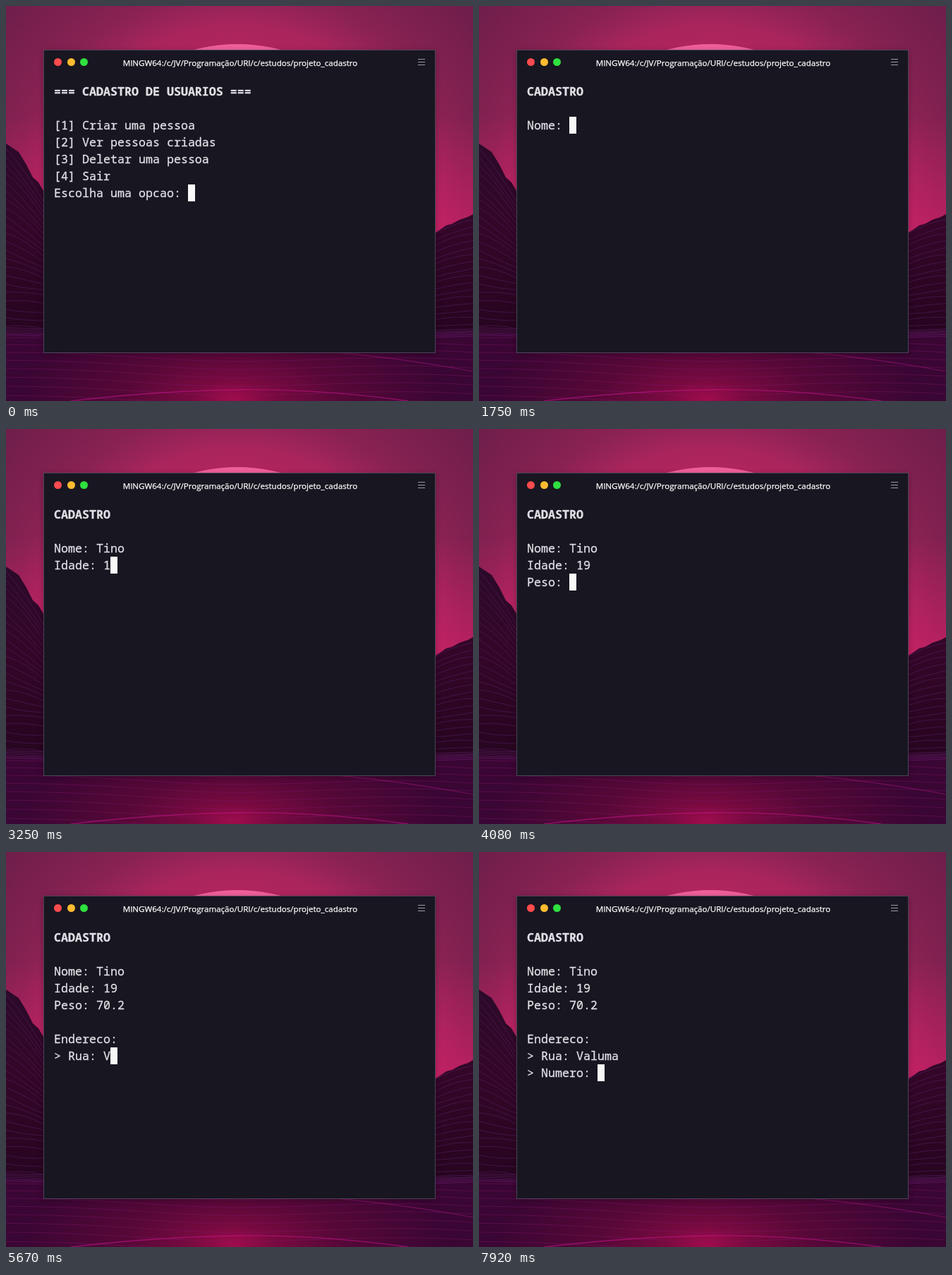
Recreate the animation shown at these times as an HTML page. Size 662 px wide and 560 px high, loop 8 s.

```html
<!DOCTYPE html>
<html lang="pt">
<head>
<meta charset="utf-8">
<title>Cadastro</title>
<style>
  html, body { margin: 0; width: 100%; height: 100%; overflow: hidden; background: #17151f; }
  svg { display: block; width: 662px; height: 560px; }
  .title { font: 11.57px "Open Sans", "Noto Sans", sans-serif; fill: #fff; stroke: #fff; stroke-width: .25; text-anchor: middle; }
  .row { font: 16.667px "Noto Sans Mono", "DejaVu Sans Mono", monospace; fill: #e2e0e6; stroke: #e2e0e6; stroke-width: .3; white-space: pre; }
  .row.head { font-weight: 700; }
  .lines path { fill: none; }
</style>
</head>
<body>
<svg viewBox="0 0 662 560">
  <defs>
    <radialGradient id="sky" gradientUnits="userSpaceOnUse" cx="328" cy="298" r="460">
      <stop offset=".5" stop-color="#b3245e"/>
      <stop offset=".59" stop-color="#a9255b"/>
      <stop offset=".63" stop-color="#9c2459"/>
      <stop offset=".7" stop-color="#8b2254"/>
      <stop offset=".78" stop-color="#802150"/>
      <stop offset="1" stop-color="#6c1d4a"/>
    </radialGradient>
    <linearGradient id="haze" x2="0" y2="1">
      <stop offset=".3" stop-color="#d8206a" stop-opacity="0"/>
      <stop offset="1" stop-color="#d8206a" stop-opacity=".65"/>
    </linearGradient>
    <linearGradient id="hill" x2="0" y2="1">
      <stop offset="0" stop-color="#2b0a2a"/>
      <stop offset=".45" stop-color="#340628"/>
      <stop offset="1" stop-color="#26051f"/>
    </linearGradient>
    <radialGradient id="glow" gradientUnits="userSpaceOnUse" cx="322" cy="0" r="300" gradientTransform="translate(0 556) scale(1 .42)">
      <stop offset="0" stop-color="#a00c4c"/>
      <stop offset=".2" stop-color="#780a40"/>
      <stop offset=".5" stop-color="#570838"/>
      <stop offset="1" stop-color="#3a0633"/>
    </radialGradient>
    <clipPath id="land">
      <path d="M0 195L18 207L29 225L38 243L46 250L56 267V470H0ZM604 324L614 318L624 311L632 309L643 303L655 299L662 295V470H604Z"/>
    </clipPath>
    <filter id="soft" x="-10%" y="-10%" width="120%" height="120%"><feGaussianBlur stdDeviation="4"/></filter>
  </defs>

  <rect width="662" height="560" fill="url(#sky)"/>
  <rect y="80" width="662" height="250" fill="url(#haze)"/>
  <circle cx="328" cy="298" r="244" fill="#f0609a"/>
  <g clip-path="url(#land)">
    <rect y="190" width="662" height="280" fill="url(#hill)"/>
    <g class="lines" id="slopes"></g>
  </g>
  <rect y="464" width="662" height="96" fill="url(#glow)"/>
  <g class="lines" id="floor"></g>

  <rect x="53" y="64" width="556" height="429" fill="#000" opacity=".25" filter="url(#soft)"/>
  <rect x="53.5" y="62.5" width="555" height="429" fill="#181620" stroke="#4b4359"/>
  <circle cx="73.5" cy="79.5" r="5.5" fill="#fb4b4e"/>
  <circle cx="92.5" cy="79.5" r="5.5" fill="#fdbc30"/>
  <circle cx="110.5" cy="79.5" r="5.5" fill="#2fe03f"/>
  <text class="title" x="332" y="85">MINGW64:/c/JV/Programação/URI/c/estudos/projeto_cadastro</text>
  <path d="M584 75.5H594M584 79.5H594M584 83.5H594" stroke="#9a98a0"/>
  <rect id="cursor" width="10" height="24" fill="#f8f8f8"/>
  <g id="screen"></g>
</svg>
<script>
const LOOP = 8000, LEFT = 68, TOP = 109, CHAR = 10, ROW = 24, ROWS = 9;
const $ = id => document.getElementById(id);

function add(parent, tag, attrs) {
  const el = document.createElementNS("http://www.w3.org/2000/svg", tag);
  for (const k in attrs) el.setAttribute(k, attrs[k]);
  return parent.appendChild(el);
}

const stroke = (parent, d, color, opacity, width = 1) =>
  add(parent, "path", { d, stroke: color, "stroke-opacity": opacity, "stroke-width": width });

function drawScenery() {
  const slopes = $("slopes"), floor = $("floor");
  for (let i = 0; i < 22; i++) {
    const y = 202 + i * 12, fall = Math.max(4, 80 - i * 4.5), wave = 5 * Math.sin(i * 1.7);
    stroke(slopes, `M0 ${y}Q26 ${y + fall * .35 + wave} 56 ${y + fall}`, "#5f2670", .45);
  }
  for (let i = 0; i < 17; i++) {
    const y = 308 + i * 9.6, rise = 17 - i, wave = 3 * Math.sin(i * 2.1);
    stroke(slopes, `M604 ${y + rise}Q632 ${y + wave} 662 ${y - rise * .3}`, "#5f2670", .45);
  }
  for (let i = 0; i < 5; i++) {
    const y = 456 + i * 2.5;
    stroke(floor, `M0 ${y}L56 ${y + 2}M606 ${y + 4}L662 ${y + 2}`, "#7a2a88", .45);
  }
  for (let i = 0; i < 10; i++) {
    const y = 470 + i * 10 + i * i * .25;
    stroke(floor, `M0 ${y}C160 ${y + 1} 240 ${y + 14} 340 ${y + 13}S540 ${y + 3} 662 ${y + 11}`, "#82186e", .4);
  }
  stroke(floor, "M92 560Q220 545 335 544T570 560", "#c4148a", .6, 1.3);
  stroke(floor, "M430 488Q550 497 662 518", "#b0188c", .45, 1.2);
}

// Terminal output over time; "\f" clears the screen.
const output = [
  [0, "=== CADASTRO DE USUARIOS ===\n\n[1] Criar uma pessoa\n[2] Ver pessoas criadas\n" +
      "[3] Deletar uma pessoa\n[4] Sair\nEscolha uma opcao: "],
  [750, "1"], [1160, "\n"], [1250, "\fCADASTRO\n\nNome: "],
  [1910, "T"], [2080, "i"], [2250, "n"], [2410, "o"], [2750, "\nIdade: "],
  [3160, "1"], [3330, "9"], [3750, "\nPeso: "],
  [4580, "7"], [4750, "0"], [5000, "."], [5170, "2"], [5420, "\n\nEndereco:\n> Rua: "],
  [5670, "V"], [6250, "a"], [6500, "l"], [6750, "u"], [6920, "m"], [7170, "a"],
  [7670, "\n> Numero: "]
];

const rows = Array.from({ length: ROWS }, (_, i) =>
  add($("screen"), "text", { class: i ? "row" : "row head", x: LEFT, y: TOP + i * ROW + 18 }));

function render(t) {
  const text = output.filter(([at]) => at <= t).map(([, s]) => s).join("");
  const lines = text.split("\f").pop().split("\n");
  rows.forEach((row, i) => {
    const line = lines[i] || "";
    if (row.textContent !== line) row.textContent = line;
  });
  const last = lines.length - 1;
  $("cursor").setAttribute("x", LEFT + lines[last].length * CHAR);
  $("cursor").setAttribute("y", TOP + last * ROW);
}

drawScenery();
render(0);
const start = performance.now();
(function tick() {
  render((performance.now() - start) % LOOP);
  requestAnimationFrame(tick);
})();
</script>
</body>
</html>
```
